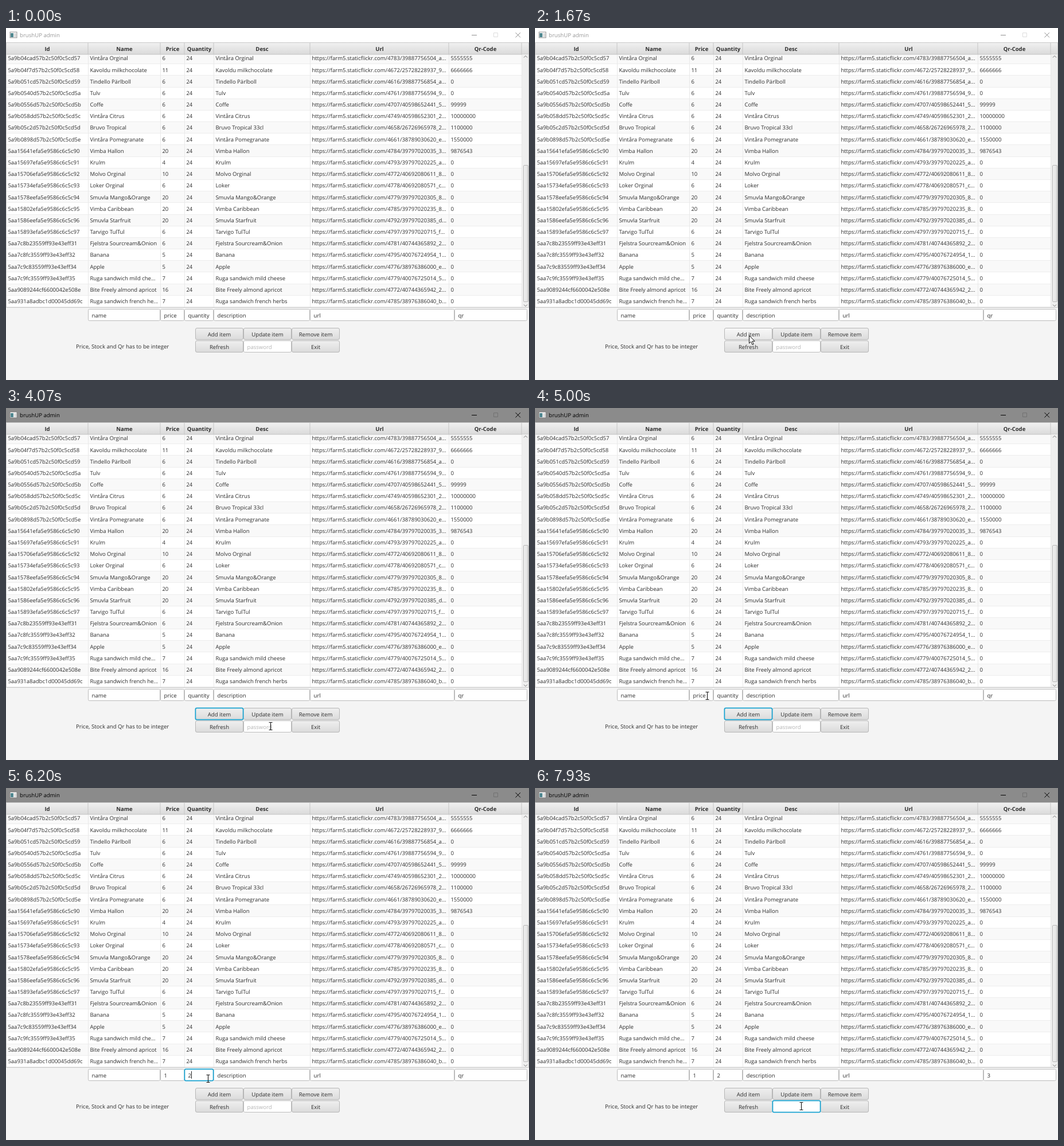
Write an HTML page that moves like this. It is 912 px wide and 614 px high and loops after 8000 ms.

```html
<!DOCTYPE html>
<html lang="en">
<head>
<meta charset="utf-8">
<title>brushUP admin</title>
<style>
html, body { margin: 0; width: 100%; height: 100%; overflow: hidden; background: #f4f4f4; }
svg { display: block; }
text { font: 9.6px "Open Sans", "Noto Sans", sans-serif; fill: #2e2e2e; text-rendering: geometricPrecision; white-space: pre; }
.cell { font-size: 9.53px; }
.head { font-weight: 700; font-size: 9.5px; }
.mid { text-anchor: middle; }
</style>
</head>
<body>
<svg id="stage" width="912" height="614" viewBox="0 0 912 614">
  <defs>
    <linearGradient id="header" x2="0" y2="1"><stop stop-color="#f1f1f1"/><stop offset="1" stop-color="#dadada"/></linearGradient>
    <linearGradient id="normal" x2="0" y2="1"><stop stop-color="#efefef"/><stop offset="1" stop-color="#dbdbdb"/></linearGradient>
    <linearGradient id="hover" x2="0" y2="1"><stop stop-color="#f8f8f8"/><stop offset="1" stop-color="#e7e7e7"/></linearGradient>
    <linearGradient id="pressed" x2="0" y2="1"><stop stop-color="#dbdbdb"/><stop offset="1" stop-color="#cdcdcd"/></linearGradient>
    <linearGradient id="thumb"><stop stop-color="#f3f3f3"/><stop offset="1" stop-color="#dedede"/></linearGradient>
  </defs>
</svg>
<script>
const stage = document.getElementById('stage');

function el(tag, attrs, text) {
  const node = document.createElementNS('http://www.w3.org/2000/svg', tag);
  set(node, attrs);
  if (text !== undefined) node.textContent = text;
  return stage.appendChild(node);
}
function set(node, attrs) {
  for (const key in attrs) node.setAttribute(key, attrs[key]);
}
const rect = (x, y, width, height, fill, more) => el('rect', { x, y, width, height, fill, ...more });
const label = (x, y, text, cls = '') => el('text', { x, y, class: cls }, text);
const path = (d, stroke, more) => el('path', { d, stroke, fill: 'none', ...more });

const rows = `5a9b04cad57b2c50f0c5cd57|Vintåra Orginal|6||4783/39887756504_a|5555555
5a9b04f7d57b2c50f0c5cd58|Kavoldu milkchocolate|11||4672/25728228937_9|6666666
5a9b051cd57b2c50f0c5cd59|Tindello Pärlboll|6||4616/39887756854_a|0
5a9b0540d57b2c50f0c5cd5a|Tulv|6||4761/39887756594_9|0
5a9b0556d57b2c50f0c5cd5b|Coffe|6||4707/40598652441_5|99999
5a9b058dd57b2c50f0c5cd5c|Vintåra Citrus|6||4749/40598652301_2|10000000
5a9b05c2d57b2c50f0c5cd5d|Bruvo Tropical|6|Bruvo Tropical 33cl|4658/26726965978_2|1100000
5a9b0898d57b2c50f0c5cd5e|Vintåra Pomegranate|6||4661/38789030620_e|1550000
5aa15641efa5e9586c6c5c90|Vimba Hallon|20||4784/39797020035_3|9876543
5aa15697efa5e9586c6c5c91|Krulm|4||4793/39797020225_a|0
5aa15706efa5e9586c6c5c92|Molvo Orginal|10||4772/40692080611_8|0
5aa15734efa5e9586c6c5c93|Loker Orginal|6|Loker|4778/40692080571_c|0
5aa1578eefa5e9586c6c5c94|Smuvla Mango&Orange|20||4779/39797020305_8|0
5aa15802efa5e9586c6c5c95|Vimba Caribbean|20||4785/39797020235_8|0
5aa1586eefa5e9586c6c5c96|Smuvla Starfruit|20||4792/39797020385_d|0
5aa15893efa5e9586c6c5c97|Tarvigo TulTul|6||4797/39797020715_f|0
5aa7c8b23559ff93e43eff31|Fjelstra Sourcream&Onion|6||4781/40744365892_2|0
5aa7c8fc3559ff93e43eff32|Banana|5||4795/40076724954_1|0
5aa7c9c83559ff93e43eff34|Apple|5||4776/38976386000_e|0
5aa7c9fc3559ff93e43eff35|Ruga sandwich mild che...|7|Ruga sandwich mild cheese|4779/40076725014_5|0
5aa9089244cf6600042e508e|Bite Freely almond apricot|16||4772/40744365942_2|0
5aa931a8adbc1d00045dd69c|Ruga sandwich french he...|7|Ruga sandwich french herbs|4785/38976386040_b|0`
  .split('\n').map(line => line.split('|'));

const edges = [0, 143, 269, 311, 362, 530, 772, 899];
const ROW = 20.18, TOP = 43;

// Table body
rect(0, 46, 912, 441, '#fff');
rows.forEach(([id, name, price, desc, url, qr], i) => {
  const y = Math.round(TOP + ROW * i), bottom = Math.round(TOP + ROW * (i + 1));
  rect(1, y, 899, bottom - y, i % 2 ? '#fff' : '#f9f9f9');
  rect(1, bottom - 1, 899, 1, '#ededed');
  const base = Math.round(56.4 + ROW * i);
  const link = `https://farm5.staticflickr.com/${url}...`;
  [id, name, price, '24', desc || name, link, qr]
    .forEach((cell, c) => label(edges[c] + 3.4, base, cell, 'cell'));
});
edges.slice(1).forEach(x => rect(x, 46, 1, 441, '#e9e9e9'));

// Header
rect(0, 25, 912, 21, 'url(#header)');
rect(0, 25, 912, 1, '#c8c8c8');
rect(0, 45.5, 912, 1, '#c4c4c4');
['Id', 'Name', 'Price', 'Quantity', 'Desc', 'Url', 'Qr-Code'].forEach((title, c) => {
  label((edges[c] + edges[c + 1]) / 2 + .5, 40, title, 'head mid');
  rect(edges[c + 1] - .5, 26, 1, 20, '#c6c6c6');
});

// Scroll bar and table border
rect(900, 46, 12, 441, '#efefef');
rect(902.5, 239.5, 8, 238, 'url(#thumb)', { stroke: '#b9b9b9', rx: 1.5 });
path('M903 51.5l3-3 3 3M903 482.5l3 3 3-3', '#777');
path('M.5 25V487.5H911.5V25', '#c8c8c8');

// Title bar
const bar = rect(0, 0, 912, 25, '#fff');
rect(7, 7, 12, 10, '#fafafa', { stroke: '#777', 'stroke-width': .8 });
rect(8, 9, 5, 7, '#4f8790');
rect(14, 9, 4, 7, '#dcdcdc');
const title = label(24, 16, 'brushUP admin');
const controls = path('M812 12.5h9M888.5 8l8.5 8.5M897 8l-8.5 8.5', '#999');
const maximise = path('M850.5 8.5h7v7h-7z', '#ddd');

// Input fields
const fields = {};
function field(key, x, y, w, text, hint) {
  rect(x + .5, y + .5, w - 1, 20, '#fff', { stroke: '#bcbcbc', rx: 2 });
  const mark = rect(x + 6, y + 3, 0, 15, '#0096c9');
  const node = label(x + 6.5, y + 14.5, text);
  if (hint) node.style.fill = '#b4b4b4';
  const caret = rect(0, y + 4, 1, 13, '#222');
  fields[key] = { x, y, w, h: 21, node, mark, caret, text };
}
field('name', 143, 490, 126, 'name');
field('price', 269, 490, 42, 'price');
field('quantity', 311, 490, 51, 'quantity');
field('description', 362, 490, 168, 'description');
field('url', 530, 490, 252, 'url');
field('qr', 782, 490, 127, 'qr');
field('password', 414, 545, 84, 'password', true);

// Buttons
function button(text, x, y) {
  const face = rect(x + .5, y + .5, 83, 20, 'url(#normal)', { stroke: '#b6b6b6', rx: 2.5 });
  label(x + 42, y + 14.5, text, 'mid');
  return { x, y, w: 84, h: 21, face };
}
const buttons = [
  button('Add item', 330, 523), button('Update item', 414, 523), button('Remove item', 498, 523),
  button('Refresh', 330, 545), button('Exit', 498, 545)
];
label(122, 559, 'Price, Stock and Qr has to be integer');

const glow = rect(0, 0, 0, 22, 'none', { stroke: '#9fd9ee', rx: 3 });
const ring = rect(0, 0, 0, 20, 'none', { stroke: '#129fcd', 'stroke-width': 1.5, rx: 2 });

// Mouse pointers
const arrow = path('M.5 .5V14L3.6 11 6 16.4 8.2 15.4 5.9 10.3H10.2z', '#111', { fill: '#fff' });
const beam = path('M-3 -6.5h2.5l.5.5.5-.5h2.5M0 -6V6M-3 6.5h2.5l.5-.5.5.5h2.5', '#111', { 'stroke-width': 1.1 });

// time, x, y
const track = [
  [200, 902, 600], [600, 690, 566], [1000, 467, 542], [1067, 420, 536], [1133, 357, 531], [1200, 374, 536],
  [1667, 373, 536], [3533, 373, 536], [3733, 390, 571], [3933, 448, 563], [4067, 461, 555], [4200, 460, 555],
  [4533, 460, 555], [4733, 380, 515], [4867, 318, 492], [5000, 300, 502], [5600, 300, 502], [5733, 352, 507],
  [6200, 352, 507], [6333, 460, 525], [6533, 715, 528], [6667, 821, 507], [6733, 821, 505], [7000, 821, 505],
  [7200, 738, 525], [7467, 560, 553], [7733, 464, 555], [8000, 464, 555]
];
// when each part gets the focus; typed fields are selected first
const focusAt = [[2800, 'add'], [5200, 'price'], [5867, 'quantity'], [6733, 'qr'], [7933, 'password']];
const typing = { price: [5333, 5600, '1'], quantity: [6000, 6133, '2'], qr: [6800, 6933, '3'] };

function pointerAt(t) {
  const i = Math.max(1, track.findIndex(p => p[0] >= t));
  const [a, b] = [track[i - 1], track[i]];
  const k = (t - a[0]) / (b[0] - a[0]);
  return { x: Math.round(a[1] + (b[1] - a[1]) * k), y: Math.round(a[2] + (b[2] - a[2]) * k) };
}
const inside = (p, r) => p.x >= r.x && p.x < r.x + r.w && p.y >= r.y && p.y < r.y + r.h;

function draw(t) {
  const active = t >= 2800;
  set(bar, { fill: active ? '#8b8b8b' : '#fff' });
  title.style.fill = active ? '#000' : '#999';
  set(controls, { stroke: active ? '#000' : '#8f8f8f' });
  set(maximise, { stroke: active ? '#727272' : '#ddd' });

  const shown = t >= 200;
  const p = shown ? pointerAt(t) : { x: -99, y: -99 };
  const overField = Object.values(fields).some(f => inside(p, f));
  set(arrow, { transform: `translate(${p.x} ${p.y})`, opacity: +(shown && !overField) });
  set(beam, { transform: `translate(${p.x + .5} ${p.y})`, opacity: +(shown && overField) });

  buttons.forEach((b, i) => {
    const down = i === 0 && t >= 2800 && t < 3200;
    set(b.face, { fill: `url(#${down ? 'pressed' : inside(p, b) ? 'hover' : 'normal'})` });
  });

  const focus = (focusAt.filter(f => f[0] <= t).pop() || [])[1];
  const target = focus === 'add' ? buttons[0] : fields[focus];
  set(ring, { opacity: +!!target });
  set(glow, { opacity: target ? .7 : 0 });
  if (target) {
    set(ring, { x: target.x + .5, y: target.y + .5, width: target.w - 1 });
    set(glow, { x: target.x - .5, y: target.y - .5, width: target.w + 1 });
  }

  for (const key in typing) {
    const f = fields[key], [selectAt, typeAt, value] = typing[key];
    const typed = t >= typeAt, selected = t >= selectAt && !typed;
    f.node.textContent = typed ? value : f.text;
    f.node.style.fill = selected ? '#fff' : '';
    const width = f.node.getComputedTextLength();
    set(f.mark, { width: selected ? width + 1 : 0 });
    const blink = focus === key && typed && (t - typeAt) % 1000 < 500;
    set(f.caret, { x: Math.round(f.x + 6.5 + width), opacity: +blink });
  }
  for (const key in fields) if (!typing[key]) set(fields[key].caret, { opacity: 0 });
  fields.password.node.textContent = focus === 'password' ? '' : 'password';
}

// The screen refreshes 15 times a second
const STEP = 1000 / 15, LOOP = 8000;
const start = performance.now();
function tick() {
  const t = (performance.now() - start) % LOOP;
  draw(Math.min(LOOP, Math.ceil(Math.floor((t + 4) / STEP) * STEP)));
  requestAnimationFrame(tick);
}
tick();
</script>
</body>
</html>
```
